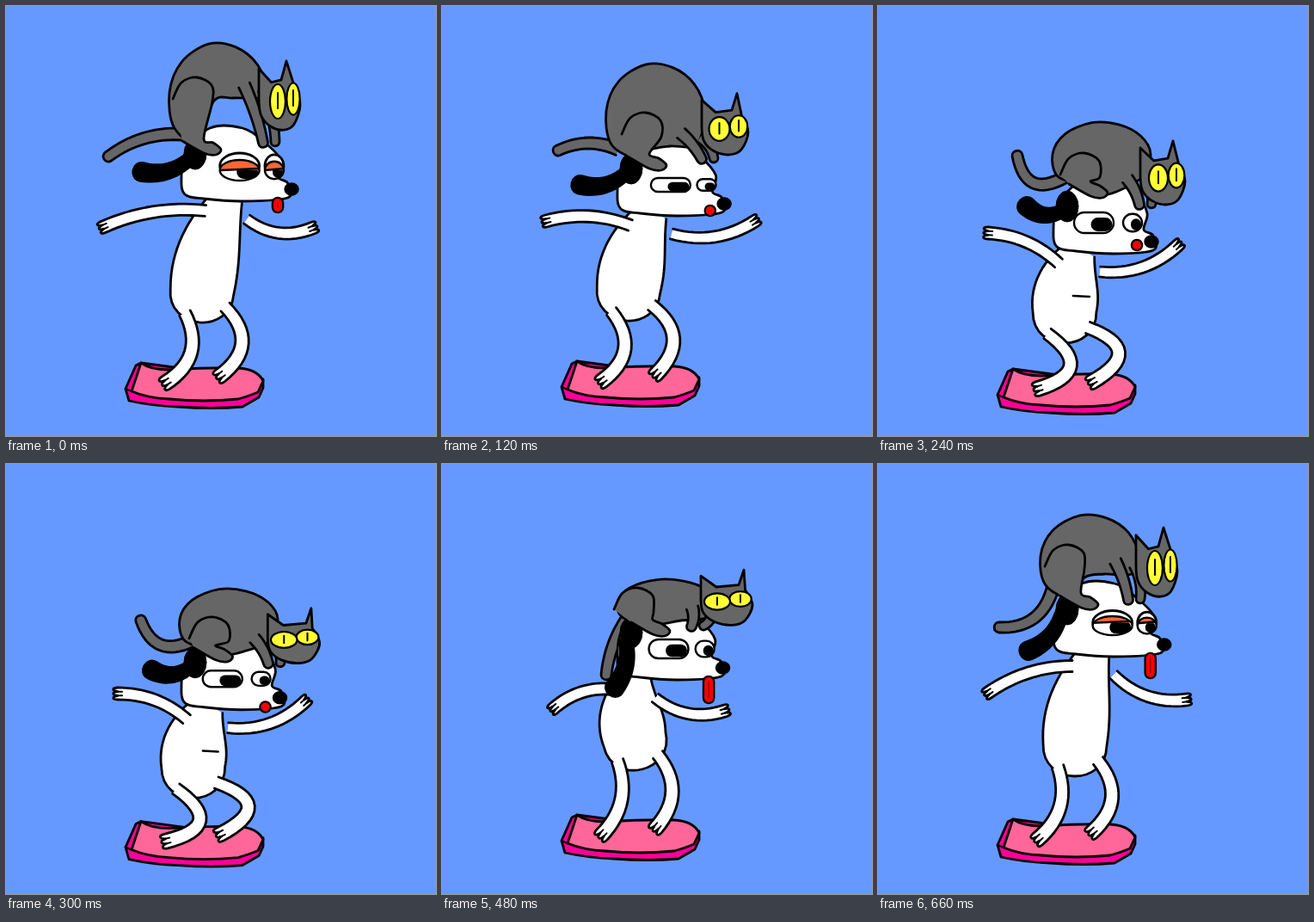
An HTML page with a canvas that plays this animation: 500 by 500 pixels, repeating every 0.72 s.

```html
<!DOCTYPE html>
<html lang="en">
<head>
<meta charset="utf-8">
<title>Skateboard ride</title>
<style>
html, body { margin: 0; width: 100%; height: 100%; overflow: hidden; background: #69f; }
canvas { display: block; width: 100vw; height: 100vh; }
</style>
</head>
<body>
<canvas id="stage" width="500" height="500"></canvas>
<script>
const ctx = document.getElementById('stage').getContext('2d');
const STEP = 60, STEPS = 12, INK = '#000', FUR = '#666', WHITE = '#fff';

// Joint positions in seven key poses; all outlines are derived from them.
const joints = {
  board: [2, 0, 9, -5, -5, -1, 0],
  jaw: [226, 243, 287, 274, 250, 222, 223],
  neck: [258, 245, 236, 236, 226, 250, 252],
  pelvis: [[228, 332], [217, 330], [217, 356], [219, 343], [224, 320], [230, 325], [229, 327]],
  handL: [[113, 257], [121, 250], [128, 264], [131, 270], [130, 284], [139, 280], [128, 266]],
  handR: [[357, 258], [364, 250], [349, 278], [347, 272], [329, 287], [334, 293], [359, 274]],
  ear: [[158, 193], [161, 208], [173, 233], [169, 245], [201, 260], [201, 246], [175, 217]],
  eyeOpen: [12, 8, 12, 7, 11, 7, 11],
  lid: [.5, 0, 0, 0, 0, 0, .35],
  lick: [13, 0, -4, 12, 27, 42, 25],
  hump: [[247, 43], [248, 67], [260, 135], [257, 145], [261, 134], [252, 103], [246, 59]],
  belly: [107, 163, 216, 210, 182, 161, 128],
  thigh: [[222, 83], [237, 124], [240, 171], [240, 175], [228, 144], [218, 104], [222, 94]],
  hindPaw: [[250, 167], [261, 185], [267, 217], [260, 223], [265, 194], [266, 160], [256, 163]],
  forePaw: [[299, 159], [302, 178], [304, 231], [304, 222], [290, 189], [308, 162], [291, 158]],
  face: [[318, 115], [329, 147], [331, 204], [337, 201], [331, 164], [328, 137], [324, 125]],
  faceWidth: [24, 27, 26, 34, 30, 26, 24],
  tail: [[119, 175], [135, 168], [162, 174], [153, 195], [191, 245], [191, 230], [141, 190]],
  curl: [8, 8, -21, -9, 5, 9, -15]
};

// Keys fall on every second step and on the last one; in-betweens follow a cubic.
function poseAt(step) {
  const u = step < STEPS - 1 ? step / 2 : 6, i = Math.floor(u), pose = {};
  const between = (a, b, c, d) => (9 * (b + c) - a - d) / 16;
  for (const name in joints) {
    const keys = joints[name];
    const near = [-1, 0, 1, 2].map(k => keys[(i + k + 7) % 7]);
    if (u === i) pose[name] = keys[i];
    else if (Array.isArray(keys[i])) pose[name] = [0, 1].map(axis => between(...near.map(p => p[axis])));
    else pose[name] = between(...near);
  }
  pose.rise = (287 - pose.jaw) / 65;
  return pose;
}

const add = ([x, y], dx, dy) => [x + dx, y + dy];

// Three-point curve from a to b, pushed sideways by k in the middle.
function bow(a, b, k) {
  const dx = b[0] - a[0], dy = b[1] - a[1], len = Math.hypot(dx, dy);
  return [a, [(a[0] + b[0]) / 2 - dy / len * k, (a[1] + b[1]) / 2 + dx / len * k], b];
}

// Catmull-Rom spline; listed corners get no tangent.
function spline(pts, closed, corners = []) {
  const n = pts.length, path = new Path2D();
  const get = i => closed ? pts[(i + n) % n] : pts[Math.max(0, Math.min(n - 1, i))];
  const tangent = (i, axis) => corners.includes((i + n) % n) ? 0 : (get(i + 1)[axis] - get(i - 1)[axis]) / 6;
  path.moveTo(...pts[0]);
  for (let i = 0; i < (closed ? n : n - 1); i++) {
    const [x0, y0] = get(i), [x1, y1] = get(i + 1);
    path.bezierCurveTo(x0 + tangent(i, 0), y0 + tangent(i, 1),
      x1 - tangent(i + 1, 0), y1 - tangent(i + 1, 1), x1, y1);
  }
  if (closed) path.closePath();
  return path;
}

function paint(path, fill, width = 2.8) {
  ctx.fillStyle = fill;
  ctx.fill(path);
  ctx.lineWidth = width;
  ctx.strokeStyle = INK;
  ctx.stroke(path);
}

function line(color, width, a, b) {
  ctx.strokeStyle = color;
  ctx.lineWidth = width;
  ctx.beginPath();
  ctx.moveTo(...a);
  ctx.lineTo(...b);
  ctx.stroke();
}

// Tube along a three-point curve, open at its root; width is a function of 0..1.
function limb([a, m, b], fill, width, fingers) {
  const sides = [[], []], ctrl = [0, 1].map(i => 2 * m[i] - (a[i] + b[i]) / 2);
  let tip, dir;
  for (let s = 0; s <= 1; s += 1 / 16) {
    tip = [0, 1].map(i => (1 - s) ** 2 * a[i] + 2 * s * (1 - s) * ctrl[i] + s * s * b[i]);
    const d = [0, 1].map(i => (1 - s) * (ctrl[i] - a[i]) + s * (b[i] - ctrl[i]));
    dir = d.map(v => v / Math.hypot(...d));
    const w = width(s);
    sides[0].push(add(tip, -dir[1] * w, dir[0] * w));
    sides[1].unshift(add(tip, dir[1] * w, -dir[0] * w));
  }
  const end = width(1);
  const at = (side, ahead) => add(tip, -dir[1] * side * end + dir[0] * ahead, dir[0] * side * end + dir[1] * ahead);
  const path = new Path2D();
  for (const p of sides[0]) path.lineTo(...p);
  if (fingers) {
    for (const k of [1, 0, -1]) {
      path.bezierCurveTo(...at(k * .75 + .25, 7), ...at(k * .75 - .25, 7), ...at((k * 2 - 1) / 3, 0));
    }
  } else {
    path.bezierCurveTo(...at(1, end * 1.3), ...at(-1, end * 1.3), ...at(-1, 0));
  }
  for (const p of sides[1]) path.lineTo(...p);
  paint(path, fill);
  if (fingers) for (const k of [-1 / 3, 1 / 3]) line(INK, 2, at(k, 0), at(k, -5));
}

const taper = (from, to) => s => from + (to - from) * s;

function pill(x, y, rx, ry) {
  const path = new Path2D();
  path.roundRect(x - rx, y - ry, rx * 2, ry * 2, Math.min(rx, ry));
  return path;
}

function oval(x, y, rx, ry) {
  const path = new Path2D();
  path.ellipse(x, y, rx, ry, 0, 0, Math.PI * 2);
  return path;
}

function drawBoard(dy) {
  ctx.save();
  ctx.translate(0, dy);
  paint(new Path2D('M157 413L151 416L139 443L143 457Q170 463 200 464Q240 467 275 464L294 453L299 442V432Z'), '#f09');
  paint(new Path2D('M157 413Q168 421 190 421Q240 418 270 419Q292 420 299 434L293 447Q284 451 270 455Q230 459 190 455Q165 454 146 446Z'), '#f69');
  line(INK, 2.4, [146, 446], [139, 443]);
  ctx.restore();
}

// The knee follows from the fixed bone length.
function drawLeg(hip, foot) {
  const half = Math.hypot(foot[0] - hip[0], foot[1] - hip[1]) / 2, bone = 46;
  limb(bow(hip, foot, -Math.sqrt(Math.max(0, bone * bone - half * half))), WHITE, taper(7, 8.5), true);
}

function drawDogBody({ board, jaw, neck, pelvis, handL, handR }) {
  const top = [neck, jaw - 4];
  limb(bow(top, pelvis, 5), WHITE, s => 18 + 20 * Math.sin(s * 1.9));
  const fold = Math.max(0, jaw - 255) * .6;
  if (fold) line(INK, 2.4, add(pelvis, 29, -18), add(pelvis, 29 - fold, -19));
  drawLeg(add(pelvis, 27, 18), [249, 428 + board]);
  drawLeg(add(pelvis, -20, 25), [186, 436 + board]);
  limb(bow(add(top, -26, 16), handL, 8), WHITE, taper(6.5, 7), true);
  limb(bow(add(top, 22, 26), handR, 11), WHITE, taper(6, 7), true);
}

function drawDogEye(x, y, rx, ry, look, lid) {
  const shape = lid > 0 ? oval(x, y, rx, ry) : pill(x, y, rx, ry);
  if (lid > 0) paint(oval(x, y - 10 * lid, rx, ry + 3), WHITE);
  ctx.save();
  ctx.clip(shape);
  ctx.fillStyle = WHITE;
  ctx.fill(shape);
  ctx.fillStyle = INK;
  ctx.fill(pill(x + look, y + 2, rx * .54, ry * .66));
  if (lid > 0) {
    const edge = y - ry + ry * 2 * lid;
    ctx.fillStyle = '#f63';
    ctx.fillRect(x - rx, y - ry, rx * 2, edge - y + ry);
    line(INK, 2.4, [x - rx, edge], [x + rx, edge - 2]);
  }
  ctx.restore();
  ctx.lineWidth = 2.4;
  ctx.strokeStyle = INK;
  ctx.stroke(shape);
}

function drawTongue(x, jaw, lick) {
  const r = 5, low = lick - r, a = [x, jaw + Math.min(3, low)], b = [x, jaw + low];
  line(INK, r * 2 + 4.6, a, b);
  line('#f00', r * 2, a, b);
  line('#900', 1.5, a, b);
}

function drawDogHead({ jaw, rise, ear, eyeOpen, lid, lick }) {
  const cx = 265, out = 8 * rise;
  const outline = [[-57, -7], [-61, -26], [-56, -56], [-28, -84], [10, -84], [35, -68],
    [48 + out, -46], [44 + out, -27], [55 + out, -20], [55 + out, -3], [10, 1], [-35, -2]];
  paint(spline(outline.map(p => add(p, cx, jaw)), true), WHITE);
  paint(oval(cx - 45, jaw - 54, 13, 18), INK, 1);
  limb(bow([cx - 52, jaw - 48], ear, -7), INK, taper(7, 10.5));
  drawDogEye(cx + 31 + 17 * rise, jaw - 35, 11, eyeOpen * .85, 4, lid);
  drawDogEye(cx - 14 + 22 * rise, jaw - 35, 23, eyeOpen, 9, lid);
  paint(oval(cx + 53 + 15 * rise, jaw - 13, 8, 7), INK, 1.5);
  drawTongue(cx + 36 + 16 * rise, jaw, lick);
}

function drawCatBody({ hump: [cx, top], belly, thigh, hindPaw, forePaw }) {
  const rx = 57, seat = hindPaw[1] - 8, h = seat - top;
  const at = (x, y) => [cx + x * rx, top + y * h];
  const back = [[-.9, .85], [-1, .5], [-.75, .19], [-.2, .01], [.35, .04], [.8, .22], [1, .5]];
  const under = [[cx + rx * .85, Math.min(top + h * .85, belly)], [cx + rx * .3, belly], [cx - rx * .1, belly + 4], at(-.4, 1)];
  paint(spline([...back.map(p => at(...p)), ...under], true), FUR);

  const shoulder = [cx + 30, belly - 15];
  limb(bow(add(shoulder, 22, 5), add(forePaw, 14, -1), -3), FUR, taper(6, 5));
  limb(bow(shoulder, forePaw, -2), FUR, taper(7, 5.5));

  const knee = [[-28, 25], [-18, 6], [0, 0], [17, 9], [18, 28]].map(p => add(thigh, ...p));
  const paw = [[-20, -13], [-9, -8], [0, 0], [-6, 6], [-20, 4], [-45, -10]].map(p => add(hindPaw, ...p));
  paint(spline([...knee, ...paw]), FUR);
}

// Head and eyes keep their area while they squash.
function drawCatFace({ face, faceWidth: rx }) {
  const ry = 700 / rx, tip = rx * 2 - 40;
  const outline = [[-rx, -.25 * ry], [-rx, -1.45 * ry], [-.4 * rx, -.9 * ry], [tip - 6, -ry],
    [tip, -1.75 * ry], [Math.max(tip, .72 * rx), -.75 * ry], [rx, 0], [.7 * rx, .78 * ry],
    [.2 * rx, ry], [-.45 * rx, .85 * ry], [-.9 * rx, .4 * ry]];
  paint(spline(outline.map(p => add(face, ...p)), true, [0, 1, 2, 3, 4, 5]), FUR);

  const wide = rx - 15, tall = 180 / wide - (wide - 9) * .4;
  for (const [dx, dy, size] of [[16, -7, .85], [-(wide - 9) * 1.5 - 2, -4, 1]]) {
    const [x, y] = add(face, dx, dy);
    paint(oval(x, y, wide * size, tall * (size + 1) / 2), '#ff3', 2.2);
    line(INK, 2, [x, y - tall * .5], [x, y + tall * .4]);
  }
}

function draw(pose) {
  ctx.fillStyle = '#69f';
  ctx.fillRect(0, 0, 500, 500);
  ctx.lineCap = ctx.lineJoin = 'round';
  const rump = [pose.hump[0] - 43, pose.hindPaw[1] - 18];
  drawBoard(pose.board);
  limb(bow(rump, pose.tail, pose.curl), FUR, taper(7, 6));
  drawDogBody(pose);
  drawDogHead(pose);
  drawCatBody(pose);
  drawCatFace(pose);
}

let shown = -1;
function tick() {
  const step = Math.floor(performance.now() / STEP) % STEPS;
  if (step !== shown) draw(poseAt(shown = step));
  requestAnimationFrame(tick);
}
tick();
</script>
</body>
</html>
```
